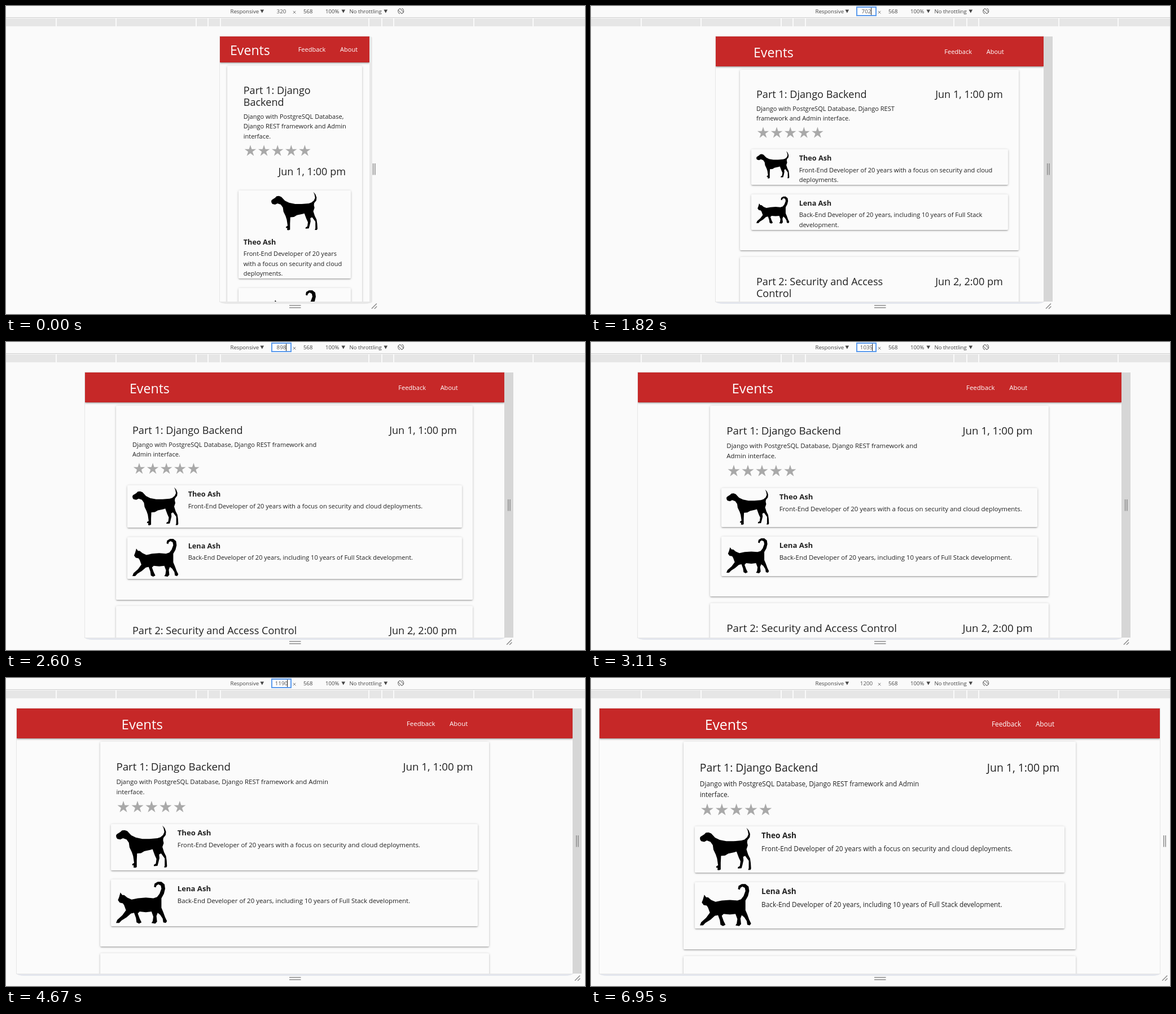
Recreate the animation shown at these times as an HTML page. Size 1026 by 546 pixels, loop 7050 ms.

```html
<!DOCTYPE html>
<html lang="en">
<head>
<meta charset="utf-8">
<title>Responsive event list</title>
<style>
  html, body { margin: 0; width: 100%; height: 100%; overflow: hidden; background: #fafafa; }
  body { font-family: "Open Sans", "Noto Sans", sans-serif; color: rgba(0, 0, 0, .87); }
  #stage { position: absolute; left: 0; top: 0; width: 1026px; height: 546px; overflow: hidden; }
  #stage div, #stage svg { position: absolute; }
  svg { overflow: visible; }
  #stage .t { white-space: pre; line-height: 0; }
  .white { color: #fff; }
  .bold { font-weight: 700; }
  .bar { left: 0; top: 0; width: 1026px; height: 20px; border-bottom: 1px solid #ccc; }
  .queries { left: 0; top: 22px; width: 1026px; height: 14px; background: #e6e6e6; }
  .queries div { top: 0; width: 2px; height: 14px; background: #fafafa; }
  .tool { color: #444; }
  #field { left: 470px; top: 1px; width: 32px; height: 13px; border: 2px solid #5b9bee; background: #fff; }
  #size { left: 468px; top: 10px; width: 40px; line-height: 0; text-align: center; font-size: 9.8px; color: #555; }
  #caret { top: 3px; width: 1px; height: 13px; background: #222; }
  #frame { top: 54px; height: 470px; background: #fbfbfb; box-shadow: 0 0 0 1px #e6e6e6; }
  #edge { top: 54px; height: 470px; }
  #foot { top: 524px; height: 4px; border-radius: 0 0 14px 14px / 0 0 4px 4px; }
  #page { left: 0; top: 0; width: 1026px; height: 546px; }
  .nav { background: #c62828; }
  .nav, .card {
    box-shadow: 0 1.7px 1.7px rgba(0, 0, 0, .14), 0 2.5px .8px -1.7px rgba(0, 0, 0, .12), 0 .8px 4px rgba(0, 0, 0, .2);
  }
  .card { background: #fbfbfb; border-radius: 1.7px; }
</style>
</head>
<body>
<div id="stage">
  <div class="bar"></div>
  <div id="tools"></div>
  <div id="field"></div>
  <div id="size"></div>
  <div id="caret"></div>
  <svg width="1026" height="20" fill="none" stroke="#666">
    <g id="arrows" fill="#444" stroke="none"></g>
    <path d="M508.8 8.8l4.6 4.6m0-4.6l-4.6 4.6" stroke="#777"/>
    <g transform="translate(699.7 9) rotate(-45)">
      <rect x="-2.2" y="-4.6" width="4.4" height="9.2" rx="1"/>
      <path d="M-4.6 2.2A5.1 5.1 0 0 1-1 -5M4.6-2.2A5.1 5.1 0 0 1 1 5"/>
    </g>
  </svg>
  <div class="queries" id="queries"></div>
  <div id="foot"></div>
  <div id="frame"></div>
  <div id="edge"></div>
  <div id="page"></div>
  <svg width="1026" height="546" stroke="#8c8c8c" stroke-width="1.5" fill="none">
    <path d="M502 530.7h20.5M502 534.7h20.5"/>
    <path id="grip" d="M6.7 279v20.5M10 279v20.5M4 536.5l9-9M9 536.8l4.3-4.3"/>
  </svg>
</div>
<script>
const $ = id => document.getElementById(id);
const LOOP = 7050, ZOOM = .828, MID = 511.4, FIT = .952;
const pen = document.createElement('canvas').getContext('2d');

// time in ms, viewport width in CSS px
const drag = [
  [710, 320], [1220, 536], [1410, 620], [1820, 702], [2130, 779], [2600, 898], [2840, 979],
  [3570, 1131], [3750, 1146], [4300, 1173], [4670, 1190], [4880, 1194]
];

const dog = `M0 32L2 28L13 21L18 16L26 15L34 18L46 31L60 38L80 42L102 42L126 40L135 37
  L143 30L147 21L145 10L141 1L148 9L152 20L151 30L144 39L143 46L145 55L141 67L146 83L152 95L154 109
  L155 126L153 130L146 130L148 125L148 102L137 87L131 90L132 101L129 114L126 125L115 126L115 122
  L121 118L123 104L118 93L111 74L104 76L86 80L76 86L64 87L63 108L63 129L58 131L53 130L54 124L49 123
  L50 119L55 116L52 95L48 83L41 68L39 54L32 44L21 40L13 44L4 42L1 38Z`;
const cat = `M3 30L5 25L7 18L10 22L13 22L18 26L25 29L35 27L48 26L60 27L66 25L70 20L73 12L72 7
  L68 5L65 7L64 10L61 9L62 4L67 1L73 1L78 5L79 12L77 20L73 27L73 36L73 42L76 49L79 57L82 63L80 66
  L76 65L75 59L71 53L67 50L65 55L66 64L63 67L57 66L59 63L60 56L57 48L48 49L38 48L35 51L38 59L41 65
  L37 67L33 65L32 58L29 50L24 51L17 57L9 62L5 66L0 66L2 61L10 54L16 46L13 38L11 35L6 34Z`;

const speakers = [
  { name: 'Theo Ash', pic: dog, view: '0 0 155 131',
    bio: 'Front-End Developer of 20 years with a focus on security and cloud deployments.' },
  { name: 'Lena Ash', pic: cat, view: '0 0 82 67',
    bio: 'Back-End Developer of 20 years, including 10 years of Full Stack development.' }
];

const starPath = 'M' + [...Array(10)].map((_, i) => {
  const a = i * Math.PI / 5, d = i % 2 ? .382 : 1;
  return (d * Math.sin(a)).toFixed(3) + ' ' + (-d * Math.cos(a)).toFixed(3);
}).join('L') + 'Z';

const px = n => n.toFixed(2) + 'px';
const box = (cls, x, y, w, h) =>
  `<div class="${cls}" style="left:${px(x)};top:${px(y)};width:${px(w)};height:${px(h)}"></div>`;

// y is the baseline
function text(str, x, y, size, cls = '', toRight = false) {
  const fs = size * FIT;
  const side = toRight ? 'right:' + px(1026 - x) : 'left:' + px(x);
  return `<div class="t ${cls}" style="${side};top:${px(y - .388 * fs)};font-size:${px(fs)}">${str}</div>`;
}

function wrap(str, size, room) {
  pen.font = size * FIT + 'px "Open Sans", "Noto Sans", sans-serif';
  const lines = [];
  let line = '';
  for (const word of str.split(' ')) {
    const next = line ? line + ' ' + word : word;
    if (line && pen.measureText(next).width > room + 4) {
      lines.push(line);
      line = word;
    } else line = next;
  }
  return [...lines, line];
}

function layout(W) {
  const small = W <= 600, large = W > 992;
  const r = ZOOM * (W >= 1200 ? 15 : large ? 14.5 : 14);
  const pageW = W * ZOOM, x0 = MID - pageW / 2;
  const boxW = pageW * (small ? .9 : large ? .7 : .85);
  const left = MID - boxW / 2, right = MID + boxW / 2;
  const pad = 24 * ZOOM, gut = .75 * r, gap = 20 * ZOOM;
  const inX = left + pad, inW = boxW - 2 * pad, tx = inX + gut;
  const navH = (small ? 56 : 64) * ZOOM, navEnd = 54 + navH;
  const out = [];

  const paragraph = (lines, x, y, size, step) => {
    lines.forEach((s, i) => out.push(text(s, x, y + i * step, size)));
    return y + (lines.length - 1) * step;
  };

  function stars(y) {
    const each = [0, 1, 2, 3, 4].map(i =>
      `<path transform="translate(${i * 2.08 * r}) scale(${.93 * r})" d="${starPath}"/>`).join('');
    out.push(`<svg width="1" height="1" fill="#a9a9a9" style="left:${px(tx + 1.05 * r)};top:${px(y + 1)}">${each}</svg>`);
  }

  function speaker(p, top) {
    const imgW = inW / (small ? 2 : 6) - 2 * gut, imgH = imgW * .835;
    const imgX = small ? MID - imgW / 2 : tx;
    const bioX = small ? tx : tx + inW / 6;
    const lines = wrap(p.bio, r, (small ? inW : inW * 10 / 12) - 2 * gut);
    const nameY = top + (small ? imgH + 28 : 1.72 * r);
    const bioY = nameY + 1.78 * r;
    const textEnd = bioY + (lines.length - 1) * 1.5 * r + 5;
    const end = small ? textEnd : Math.max(textEnd, top + imgH + 6.8);
    out.push(box('card', inX, top, inW, end - top));
    out.push(`<svg viewBox="${p.view}" preserveAspectRatio="none" style="left:${px(imgX)};top:${px(top + 2.6)};` +
      `width:${px(imgW)};height:${px(imgH)}"><path d="${p.pic}"/></svg>`);
    out.push(text(p.name, bioX, nameY, 1.15 * r, 'bold'));
    paragraph(lines, bioX, bioY, r, 1.5 * r);
    return end + gap;
  }

  function session(top, title, date, about) {
    const slot = out.push('') - 1;
    const size = 1.64 * r;
    const room = inW * (small ? 1 : large ? 8 / 12 : 7 / 12) - 2 * gut;
    const titleY = top + 4.3 * r;
    let y = paragraph(wrap(title, size, room), tx, titleY, size, 1.1 * size);
    let end = 700;
    let dateY = titleY;
    if (about) {
      y = paragraph(wrap(about, r, room), tx, y + 2.01 * r, r, 1.5 * r) + 1.8 * r;
      stars(y);
      if (small) dateY = y + 3.77 * r;
      y = small ? dateY + 27 : y + 30.2;
      for (const p of speakers) y = speaker(p, y);
      end = y + pad;
    }
    out.push(text(date, right - pad - gut, dateY, size, '', true));
    out[slot] = box('card', left, top, boxW, end - top);
    return end + r;
  }

  const next = session(navEnd + r / 2, 'Part 1: Django Backend', 'Jun 1, 1:00 pm',
    'Django with PostgreSQL Database, Django REST framework and Admin interface.');
  if (next < 524) session(next, 'Part 2: Security and Access Control', 'Jun 2, 2:00 pm');

  const navMid = 54 + navH / 2, linkY = navMid + .37 * r;
  const brandX = small ? x0 + 18 : left + (large ? 38 : 23.6);
  const linkX = small ? x0 + pageW - 20.8 : right - (large ? 38 : 26.7);
  out.push(box('nav', x0, 54, pageW, navH));
  out.push(text('Events', brandX, navMid + .414 * 2.1 * r, 2.1 * r, 'white'));
  out.push(text('About', linkX, linkY, r, 'white', true));
  out.push(text('Feedback', linkX - 2.75 * r - 24.8, linkY, r, 'white', true));
  return out.join('');
}

function widthAt(t) {
  if (t < 710) return 320;
  if (t >= 5190) return 1200;
  if (t >= 5090) return 1197;
  const i = drag.findIndex(k => k[0] > t);
  if (i < 0) return 1194;
  const [t0, a] = drag[i - 1], [t1, b] = drag[i];
  return Math.round(a + (b - a) * (t - t0) / (t1 - t0));
}

function edgeStyle(t) {
  if (t < 440) return [5.5, '#e8e8e8'];
  if (t < 6230) return [16, '#d6d6d6'];
  return t < 6260 ? [16, '#ebebeb'] : [0, 'transparent'];
}

let shown = 0;
function render(t) {
  const W = widthAt(t);
  // the page repaints late while the drag is fast
  const inner = t < 1410 ? widthAt(t - 46) : W;
  const w = W * ZOOM, x = MID - w / 2, end = x + w;
  const [edgeW, edgeFill] = edgeStyle(t);
  const focus = t >= 710 && t < 6950;

  if (inner !== shown) $('page').innerHTML = layout(shown = inner);
  $('page').style.clipPath = `inset(54px ${px(1026 - end)} 22px ${px(x)})`;
  Object.assign($('frame').style, { left: px(x), width: px(w) });
  Object.assign($('edge').style, {
    left: px(end), width: px(edgeW), background: edgeFill,
    borderRadius: t < 440 ? '0 4px 0 0' : '0'
  });
  Object.assign($('foot').style, {
    left: px(x), width: px(w + (t < 440 ? 5.5 : 0)),
    background: t < 710 ? '#e8e8e8' : '#e3e6ed'
  });
  $('grip').setAttribute('transform', `translate(${end.toFixed(2)})`);
  $('size').textContent = W;
  $('field').style.display = focus ? '' : 'none';
  $('caret').style.display = focus && (t < 6230 || t >= 6710) ? '' : 'none';
  $('caret').style.left = W > 999 ? '498px' : '496px';
}

const tools = [['Responsive', 397.5], ['568', 527], ['100%', 566], ['No throttling', 608.5]];
$('tools').innerHTML = tools.map(([s, x]) => text(s, x, 13.4, 10.1, 'tool')).join('');
$('arrows').innerHTML = [450.5, 594.5, 669.5].map(x => `<path d="M${x} 6.5h6.6l-3.3 6z"/>`).join('');
$('queries').innerHTML = [88, 194, 336, 357, 379, 642, 665, 686, 828, 933]
  .map(x => `<div style="left:${x}px"></div>`).join('');

function tick() {
  render(performance.now() % LOOP);
  requestAnimationFrame(tick);
}
tick();
</script>
</body>
</html>
```
